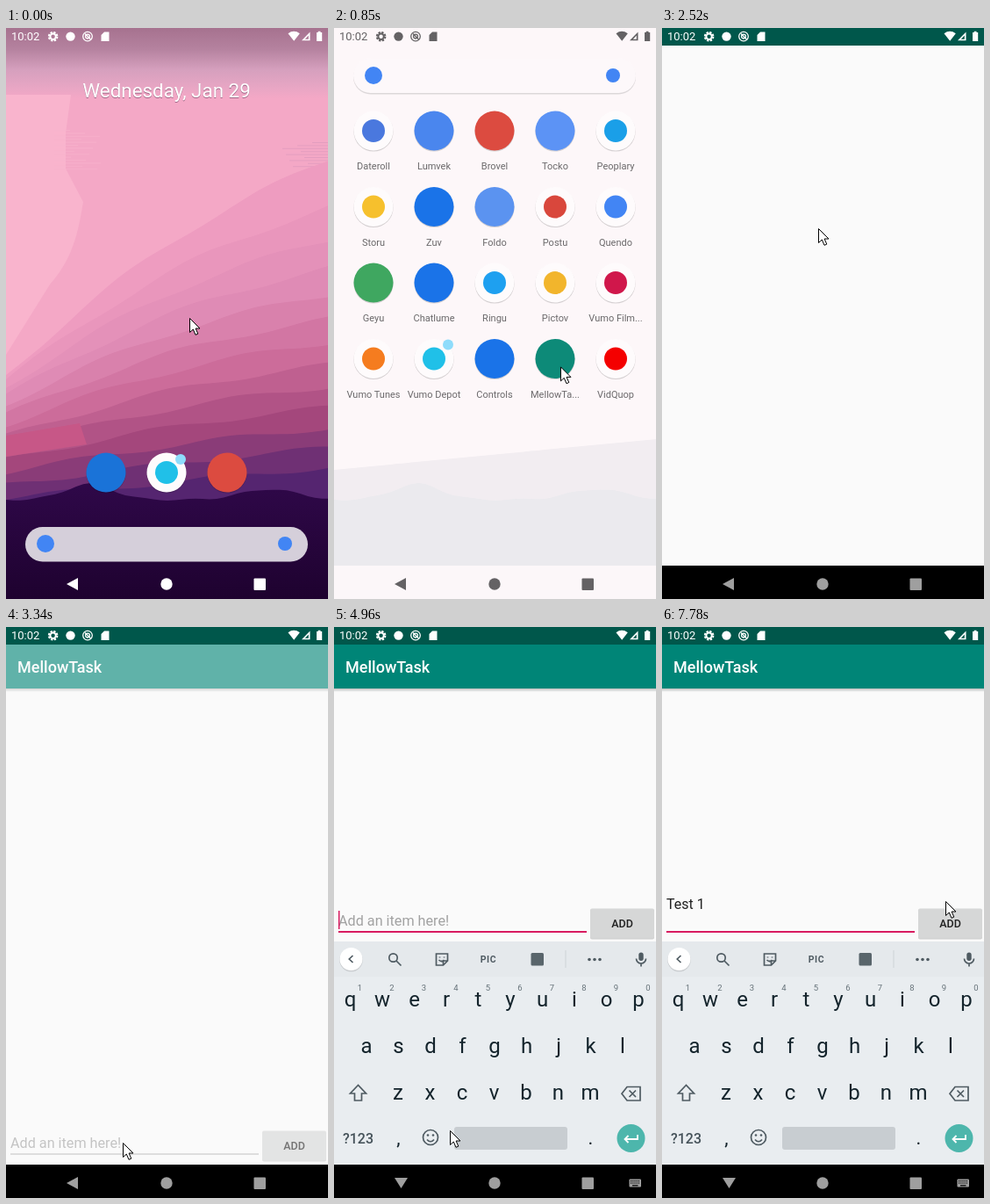
These frames come from a looping animation (367 by 650 pixels, 7.99 s). An HTML page:

```html
<!DOCTYPE html>
<html lang="en">
<head>
<meta charset="utf-8">
<title>Task list demo</title>
<style>
  html, body { margin: 0; width: 100%; height: 100%; overflow: hidden; background: #000; }
  svg { display: block; width: 100vw; height: 100vh; }
  text { font-family: Roboto, sans-serif; white-space: pre; }
  .mid { text-anchor: middle; }
  .line { fill: none; stroke: #4f5b62; stroke-width: 1.7; }
</style>
</head>
<body>
<svg id="stage" viewBox="0 0 367 650"></svg>
<script>
const LOOP = 7990;
const W = 367, H = 650;
const DRAWER_TRAVEL = 533;
const ROW_LIFT = 253;

// name, colour, whether the colour fills the whole disc
const APPS = [
  ["Dateroll", "#4a78de"], ["Lumvek", "#4a86ee", 1], ["Brovel", "#dc4b40", 1], ["Tocko", "#5c93f5", 1], ["Peoplary", "#1a9fe8"],
  ["Storu", "#f6c02d"], ["Zuv", "#1a73e8", 1], ["Foldo", "#5b93f0", 1], ["Postu", "#d9473c"], ["Quendo", "#4285f4"],
  ["Geyu", "#3fa760", 1], ["Chatlume", "#1a73e8", 1], ["Ringu", "#1ea0f0"], ["Pictov", "#f2b52c"], ["Vumo Film...", "#d0174b"],
  ["Vumo Tunes", "#f57c1f"], ["Vumo Depot", "#20c0e8"], ["Controls", "#1a73e8", 1], ["MellowTa...", "#0d8a78", 1], ["VidQuop", "#f40000"]
];
const DUSK = ["#ee9cc0", "#df8bb5", "#cc6c9a", "#a4477c", "#552570"];

const clamp = x => Math.max(0, Math.min(1, x));
const ramp = (t, a, b) => clamp((t - a) / (b - a));
const easeOut = (x, n) => 1 - (1 - x) ** n;
const lerp = (a, b, k) => a + (b - a) * k;

const rect = (x, y, w, h, fill, r = 0, more = "") =>
  `<rect x="${x}" y="${y}" width="${w}" height="${h}" rx="${r}" fill="${fill}" ${more}/>`;
const disc = (x, y, r, fill, more = "") =>
  `<circle cx="${x}" cy="${y}" r="${r}" fill="${fill}" ${more}/>`;
const label = (x, y, size, fill, text, more = 'class="mid"') =>
  `<text x="${x}" y="${y}" font-size="${size}" fill="${fill}" ${more}>${text}</text>`;
const badge = (x, y) => disc(x, y, 6, "#8edcfb");

function icon(x, y, color, full) {
  const shade = disc(x, y + 1, 22.6, "#000", 'opacity=".16"');
  return shade + (full ? disc(x, y, 22.5, color) : disc(x, y, 22.5, "#fefbfc") + disc(x, y, 13, color));
}

// everything below the curve y = edge(x)
function land(edge, color) {
  let d = `M0 ${H}`;
  for (let x = 0; x <= W + 7; x += 8) d += `L${x} ${edge(x).toFixed(1)}`;
  return `<path d="${d}V${H}Z" fill="${color}"/>`;
}

const bump = (x, center, width) => Math.exp(-(((x - center) / width) ** 2));
const ridge = x => 537 - 18 * bump(x, 95, 38) - 12 * bump(x, 300, 45) + Math.sin(x / 9);

function duskColor(k) {
  const pos = k * (DUSK.length - 1), i = Math.min(Math.floor(pos), DUSK.length - 2);
  return `color-mix(in srgb, ${DUSK[i + 1]} ${(pos - i) * 100}%, ${DUSK[i]})`;
}

// bands fan out from the left and grow steeper towards the sky
function dusk() {
  let out = "";
  for (let k = 0; k <= 1; k += 1 / 12) {
    const left = 395 + 140 * k ** 1.3, right = 150 + 350 * k ** .75;
    const edge = x => lerp(left, right, x / W) - 25 * (1 - k) * Math.sin(Math.PI * x / W)
      + 3 * Math.sin(x / 28 + k * 40);
    out += land(edge, duskColor(k));
  }
  return out;
}

function streaks(x, y, count, dir) {
  let out = "";
  for (let i = 0; i < count; i++) {
    const len = 18 + (i * 17) % 38;
    out += rect(dir > 0 ? x : x - len, y + i * 3.4, len, 1, dir > 0 ? "#f9b4cd" : "#d996bb", 0, 'opacity=".6"');
  }
  return out;
}

function wallpaper() {
  return rect(0, 0, W, H, "url(#sky)")
    + `<path fill="#f9b4cd" d="M0 76H74L68 120V160L88 198C82 235 76 262 50 292L0 372Z"/>`
    + streaks(55, 116, 14, 1) + streaks(W, 130, 10, -1)
    + dusk()
    + `<path fill="#c75787" d="M0 464L84 450 92 474 0 488Z"/>`
    + land(ridge, "url(#ground)");
}

function drawerItems() {
  return APPS.map(([name, color, full], i) => {
    const x = 45 + 69 * (i % 5), y = 117 + 86.5 * Math.floor(i / 5);
    return icon(x, y, color, full) + label(x, y + 44, 11, "#6b696b", name)
      + (i === 16 ? badge(x + 16, y - 16) : "");
  }).join("");
}

function statusIcons() {
  return `<g id="status">
    <text x="6" y="14" font-size="13">10:02</text>
    <g fill="none" stroke="currentColor" stroke-width="2"><circle cx="53.6" cy="9.7" r="3.2"/>
      <circle cx="53.6" cy="9.7" r="4.8" stroke-dasharray="2.4 1.37"/></g>
    <circle cx="73.5" cy="9.6" r="5.2"/>
    <g fill="none" stroke="currentColor" stroke-width="1.3"><circle cx="93" cy="9.6" r="5.3"/>
      <circle cx="93" cy="9.6" r="2.4"/><path d="M90 6.5L96.5 13"/></g>
    <path d="M112 4.5h5.500v10.500h-9v-7z"/>
    <path d="M321.5 6.2Q328 1.5 334.8 6.2L328.200 14.8Z"/>
    <path d="M346.5 4.5v9.800h-9.500zM344.800 8.500v4.200h-4z" fill-rule="evenodd"/>
    <path d="M354 5h1.700v-1.300h2.800v1.300h1.700v10h-6.200z"/>
  </g>`;
}

function navIcons() {
  let dots = "";
  for (let i = 0; i < 10; i++) dots += rect(338 + (i % 5) * 2.2, 630 + Math.floor(i / 5) * 2.4, 1.2, 1.2, "#000");
  return `<g id="nav">
    <path id="back" d="M69 633L82 626v14z"/>
    <path id="hide" d="M69 627h15l-7.500 12z"/>
    <circle cx="183" cy="633" r="6.7"/>
    <rect x="282.5" y="626.5" width="13.5" height="13.5" rx="1"/>
    <g id="ime">${rect(336.5, 628.5, 13.5, 9, "currentColor", 1)}${dots}${rect(340, 635.2, 6.5, 1.2, "#000")}</g>
  </g>`;
}

function keyboard() {
  const ink = "#14242c";
  const row = (keys, x, y) => [...keys].map((k, i) => label(x + 36.5 * i, y, 24, ink, k)).join("");
  const digits = [..."1234567890"].map((d, i) => label(29.5 + 36.5 * i, 414, 9.5, "#667279", d)).join("");
  return `<g id="keys">
    ${rect(0, 358, W, 256, "#e9edf0")}${rect(0, 358, W, 40, "#e5e9ec")}
    ${disc(19.5, 379, 13.3, "#000", 'opacity=".12"')}${disc(19.5, 378, 13, "#fff")}
    <path class="line" d="M21.5 374l-4.200 4 4.200 4"/>
    <g id="tools">
      <circle class="line" cx="67.5" cy="376.5" r="4.7"/><path class="line" d="M71 380l5.500 5.500"/>
      <path class="line" d="M116.5 372h13v8l-5 5h-8zM129.5 380h-5v5M119.5 379q3 3 6 0M120.500 375.500v1M125.500 375.500v1"/>
      ${label(176, 382, 10.5, "#4f5b62", "PIC", 'class="mid" font-weight="700" letter-spacing=".6"')}
      ${rect(224.5, 371, 14.5, 14.5, "#59656b", 1.5)}
      ${rect(263.5, 368, 1, 20, "#cdd3d6")}
      ${[291, 297, 303].map(x => disc(x, 378.5, 1.8, "#4f5b62")).join("")}
    </g>
    <g id="words">
      ${[75, 176, 272].map(x => label(x, 383.5, 15, "#37474f", "")).join("")}
      ${rect(125, 369, 1, 18, "#cdd3d6")}${rect(227, 369, 1, 18, "#cdd3d6")}
    </g>
    ${rect(347.3, 370.5, 5.4, 9.5, "#4f5b62", 2.7)}
    <path class="line" d="M344.5 377.5a5.500 5.500 0 0 0 11 0M350 383v3.500"/>
    ${digits}${row("qwertyuiop", 18.5, 432)}${row("asdfghjkl", 37, 485)}${row("zxcvbnm", 73, 538)}
    <path class="line" d="M27.5 521.5l-9 9.500h5v8h8v-8h5z"/>
    <path class="line" d="M334 523.5h15v15.500h-15l-6-7.750zM336.500 527.500l7.500 7.500M344 527.500l-7.500 7.500"/>
    ${label(27.5, 587.5, 16, "#46535a", "?123", 'class="mid" font-weight="500"')}
    ${label(73.5, 589, 22, ink, ",")}${label(292.5, 589, 22, ink, ".")}
    <circle class="line" cx="110" cy="581" r="8.5"/><path class="line" d="M106 583.5q4 4.500 8 0"/>
    ${disc(107, 578.5, 1.3, "#4f5b62")}${disc(113, 578.5, 1.3, "#4f5b62")}
    ${rect(137, 569, 129, 26, "#c8cdd1", 3)}
    ${disc(338.5, 582, 16, "#4db6ac")}
    <path d="M346 578v5h-14M335.500 579l-4 4 4 4" fill="none" stroke="#fff" stroke-width="1.8"/>
  </g>`;
}

function appWindow() {
  return `<g id="win" clip-path="url(#winClip)"><g id="winBody">
    ${rect(0, 0, W, H, "#fafafa")}
    <g id="content">
      ${rect(0, 70, W, 4, "url(#shade)")}${rect(0, 20, W, 50, "#008577")}
      ${label(13, 52, 18, "#fff", "MellowTask", 'font-weight="500"')}
      <g id="row">
        ${label(5, 593, 16.2, "#a2a2a2", "Add an item here!", 'id="hint"')}
        ${label(5, 593, 16, "#212121", "", 'id="typed"')}
        ${rect(5, 576, 1.5, 21, "#d81b60", 0, 'id="caret"')}
        <rect id="rule" x="5" width="283"/>
        ${rect(292, 574.5, 73, 34, "#000", 2, 'opacity=".18"')}${rect(292, 573.5, 73, 34, "#d6d7d7", 2)}
        ${label(328.5, 595, 12.5, "#212121", "ADD", 'class="mid" font-weight="500"')}
      </g>
      ${keyboard()}
    </g>
    ${rect(0, 0, W, 20, "#00574b")}${rect(0, 612, W, 38, "#000")}
  </g></g>`;
}

document.getElementById("stage").innerHTML = `
  <defs>
    <linearGradient id="sky" gradientUnits="userSpaceOnUse" x1="0" y1="0" x2="0" y2="80">
      <stop stop-color="#a6728f"/><stop offset=".3" stop-color="#b5829f"/>
      <stop offset=".6" stop-color="#d6a0be"/><stop offset=".85" stop-color="#e8a6c4"/><stop offset="1" stop-color="#f4a8c6"/>
    </linearGradient>
    <linearGradient id="ground" x1="0" y1="0" x2="0" y2="1">
      <stop stop-color="#2f0849"/><stop offset="1" stop-color="#1e022f"/>
    </linearGradient>
    <linearGradient id="shade" x1="0" y1="0" x2="0" y2="1">
      <stop stop-color="#000" stop-opacity=".24"/><stop offset="1" stop-color="#000" stop-opacity="0"/>
    </linearGradient>
    <clipPath id="winClip"><rect id="winBox"/></clipPath>
  </defs>
  ${wallpaper()}
  <g id="home">
    ${label(183, 80, 22.4, "#5c3050", "Wednesday, Jan 29", 'class="mid" opacity=".55"')}
    ${label(183, 79, 22.4, "#fff", "Wednesday, Jan 29")}
    <g id="dock">${icon(114, 506, "#1a73d8", 1)}${icon(183, 506, "#20c0e8")}${badge(199, 491)}${icon(252, 506, "#dc4b40", 1)}</g>
  </g>
  <rect id="scrim" width="367" height="650" fill="#a26288"/>
  <rect id="sheet" width="367" height="1300" rx="10" fill="#fdf7f9"/>
  <g id="hills">${land(x => lerp(503, 468, x / W), "#f2edf1")}${land(ridge, "#ebeaee")}</g>
  <g id="drawer">
    <g id="apps">
      ${rect(22, 36, 322, 39.5, "#000", 19.7, 'opacity=".13"')}${rect(22, 34.5, 322, 39.5, "#fdf8fa", 19.7)}
      ${drawerItems()}
    </g>
    ${rect(22, 35, 322, 39.5, "#d5cfda", 19.7, 'id="pill"')}
    ${disc(45, 54, 10, "#4285f4")}${disc(318, 54, 8, "#4285f4")}
  </g>
  <rect id="navBack" y="612" width="367" height="38" fill="#fdf8fa"/>
  ${appWindow()}
  ${statusIcons()}
  ${navIcons()}
  <path id="cursor" d="M.5 .5V16.500L4.300 13 7 19.300 9.800 18.100 7.100 12H12Z" fill="#fff" stroke="#000"/>`;

const el = {};
document.querySelectorAll("[id]").forEach(n => el[n.id] = n);
const words = el.words.querySelectorAll("text");

// start, end, x, y of each pointer move
const MOVES = [
  [300, 800, 258, 385], [850, 1060, 251, 467], [1110, 1420, 274, 391], [2250, 2520, 178, 228],
  [2660, 3250, 133, 587], [3510, 3511, 132, 573], [7400, 7780, 323, 312]
];
const ITEM = "Test 1";
const KEY_TIMES = [5330, 5420, 5580, 5630, 6340, 6490];
const FOCUS = 3840, KEYS_UP = 3960, ENTER = 7010;
const CARET_RESETS = [FOCUS, KEYS_UP, ...KEY_TIMES, ENTER];

const show = (node, on) => node.style.display = on ? "" : "none";
const fade = (node, a) => node.style.opacity = a;
const move = (node, x, y) => node.setAttribute("transform", `translate(${x} ${y})`);
const set = (node, attrs) => { for (const k in attrs) node.setAttribute(k, attrs[k]); };
const tint = (node, c) => { node.style.color = c; node.style.fill = c; };

function pointer(t) {
  let x = 209, y = 330;
  for (const [from, to, toX, toY] of MOVES) {
    const k = ramp(t, from, to);
    x = lerp(x, toX, k);
    y = lerp(y, toY, k);
  }
  return [x, y];
}

function drawLauncher(t) {
  const p = easeOut(ramp(t, 280, 782), 4);
  const shift = DRAWER_TRAVEL * (1 - p);
  const leave = ramp(t, 1700, 2080);
  fade(el.home, 1 - ramp(p, 0, .5));
  move(el.dock, 0, -200 * p);
  fade(el.scrim, .9 * ramp(p, 0, .8));
  set(el.sheet, { y: shift - 2 - 20 * ramp(p, .87, 1) });
  fade(el.sheet, ramp(p, 0, .4));
  fade(el.hills, ramp(p, .4, .85));
  move(el.drawer, 0, shift - 39 * leave);
  fade(el.drawer, 1 - .74 * leave);
  fade(el.apps, ramp(p, .2, .95));
  fade(el.pill, 1 - ramp(p, .1, .6));
  fade(el.navBack, .95 * ramp(t, 600, 760));
}

// the window grows out of the tapped icon
function drawWindow(t) {
  const k = easeOut(ramp(t, 1850, 2250), 2.25);
  const x = lerp(157, 0, k), y = lerp(376, 0, k);
  const width = lerp(105, W, k), height = lerp(50, H, k);
  show(el.win, t >= 1850);
  set(el.winBox, { x, y, width, height, rx: lerp(86, 0, k) });
  set(el.winBody, { transform: `translate(${x} ${y}) scale(${width / W})` });
  fade(el.win, ramp(t, 1840, 1900));
  fade(el.content, ramp(t, 3170, 3450));
}

function drawInput(t) {
  const focused = t >= FOCUS, raised = t >= KEYS_UP, wrapped = t >= ENTER;
  const text = ITEM.slice(0, KEY_TIMES.filter(k => k <= t).length);
  const word = text.trim();
  move(el.row, 0, raised ? -ROW_LIFT : 0);
  set(el.rule, { y: focused ? 599 : 599.5, height: focused ? 2 : 1, fill: focused ? "#d81b60" : "#9c9c9c" });
  show(el.hint, !text);
  el.typed.textContent = text;
  el.typed.style.textDecoration = text === word && text !== ITEM ? "underline" : "none";
  set(el.typed, { y: wrapped ? 574 : 593 });

  const since = CARET_RESETS.findLast(r => r <= t);
  show(el.caret, focused && Math.floor((t - since) / 500) % 2 === 0);
  set(el.caret, { x: text && !wrapped ? 5 + el.typed.getComputedTextLength() : 5 });

  const suggest = text && t < 6610;
  show(el.keys, raised);
  move(el.keys, 0, 254 * (1 - easeOut(ramp(t, KEYS_UP, 4280), 2)));
  show(el.tools, !suggest);
  show(el.words, suggest);
  ["", "s", "er"].forEach((end, i) => words[i].textContent = word + end);
}

function drawSystem(t) {
  const app = t >= 2200, light = t >= 600 && !app, raised = t >= KEYS_UP;
  tint(el.status, light ? "#646264" : "#fff");
  tint(el.nav, light ? "#646264" : app ? "#9f9f9f" : "#fff");
  show(el.back, !raised);
  show(el.hide, raised);
  show(el.ime, raised);
  show(el.cursor, t < 300 || t >= 800);
  move(el.cursor, ...pointer(t));
}

const start = performance.now();
function frame() {
  const t = (performance.now() - start) % LOOP;
  drawLauncher(t);
  drawWindow(t);
  drawInput(t);
  drawSystem(t);
  requestAnimationFrame(frame);
}
frame();
</script>
</body>
</html>
```
